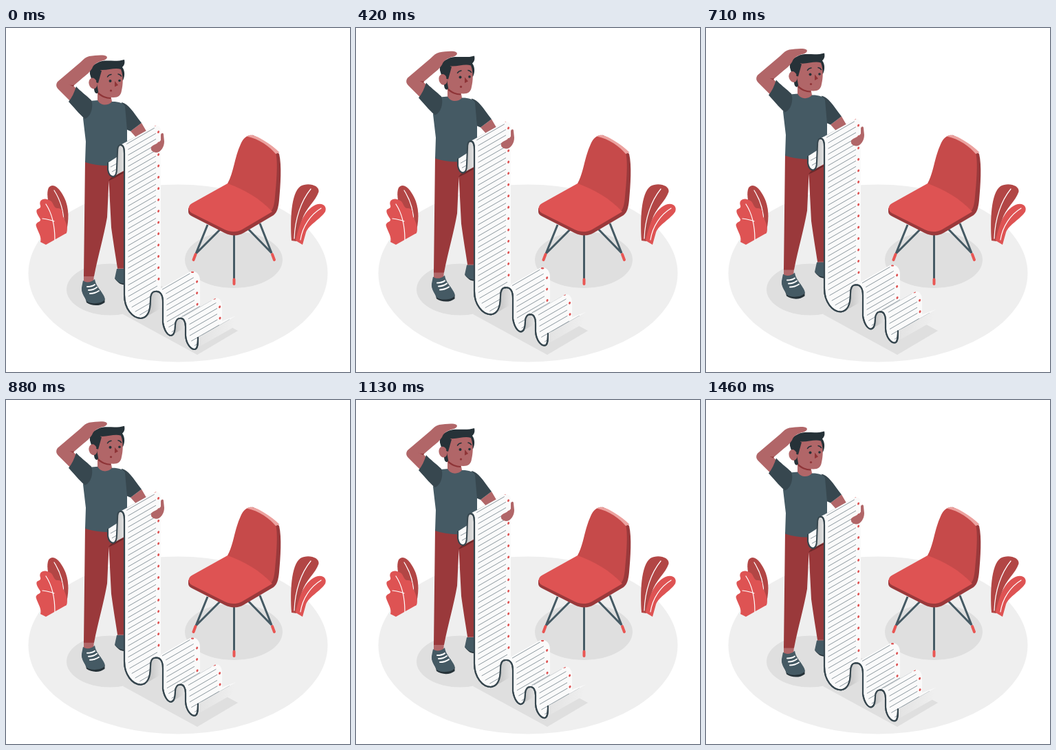
These frames come from a looping animation (500 by 500 pixels, 1.5 s). An HTML page:

```html
<!DOCTYPE html>
<html lang="en">
<head>
<meta charset="utf-8">
<title>Long list</title>
<style>
html, body { margin: 0; width: 100%; height: 100%; overflow: hidden; background: #fff; }
svg { display: block; width: 100%; height: 100%; }
.red { fill: #de5353; } .wine { fill: #9a393b; } .leaf { fill: #b24645; }
.skin { fill: #b16668; } .shirt { fill: #455a64; } .sleeve { fill: #37474f; }
.ink { fill: #263238; } .paper { fill: #fafafa; }
.vein, .lace { fill: none; stroke: #fff; stroke-width: 1.2; stroke-linecap: round; }
.lace { stroke-width: 2; }
.leg { fill: none; stroke: #455a64; stroke-width: 3; }
.tip { fill: none; stroke: #e95653; stroke-width: 4; stroke-linecap: round; }
.edge { fill: none; stroke: #37474f; stroke-width: 2.1; stroke-linecap: round; stroke-linejoin: round; }
.rule { stroke: #7f8d95; stroke-width: .9; }
</style>
</head>
<body>
<svg viewBox="0 0 500 500">
  <defs>
    <linearGradient id="fold"><stop offset="0" stop-color="#bdbdbd"/><stop offset="1" stop-color="#e6e6e6"/></linearGradient>
    <linearGradient id="back"><stop offset="0" stop-color="#e2e2e2"/><stop offset="1" stop-color="#efefef"/></linearGradient>
  </defs>

  <ellipse cx="250" cy="356.5" rx="217.5" ry="129" fill="#efefef"/>
  <g fill="#dfdfdf">
    <ellipse cx="151" cy="380" rx="63" ry="37.5"/>
    <ellipse cx="331" cy="337" rx="71" ry="41"/>
    <path d="M170 416L278 475L337 440L324 433L280 410L226 375Z"/>
  </g>

  <!-- plants -->
  <path class="leaf" d="M82 298C70 280 55 247 62 232C70 222 82 238 87 252C93 270 90 285 87 299Z"/>
  <path class="vein" d="M70 236C79 250 84 267 84 284"/>
  <path class="red" d="M58 315L50 311C53 304 44 292 43.500 286C45 281 51 282 50 278C46 272 43 267 45 264C48 262 51 262 50 258C47 250 55 246 62 250C70 252 68 261 74 262C80 262 83 264 82 272C86 280 91 290 88 298Z"/>
  <path class="vein" d="M58 256C66 268 71 284 71 308M53 277C60 278 65 279 70 281"/>
  <path class="leaf" d="M415 309C413 280 414 240 428 230C438 224 456 228 454.500 238C450 252 435 262 430 280C426 293 424 303 422 310Z"/>
  <path class="vein" d="M443 234C429 251 420 277 419 306"/>
  <path class="red" d="M421 309C425 290 432 265 450 257C461 253 467 260 464 267C458 277 440 286 436 297L431 315Z"/>
  <path class="vein" d="M458 262C443 271 431 288 428 308"/>

  <!-- chair -->
  <path class="leg" d="M293 286L276 328L311 293M369 284L386 327L350 290M331.500 298V366"/>
  <path class="tip" d="M275.500 329L272.500 337M387 329L390 337M331.500 365.500V372"/>
  <path class="wine" d="M265 262V267C265 270 267 272 271 274L318 298C326 302 337 303 345 298L389 272C394 268 396 261 397 250C399 228 401 200 397 183C390 176 370 160 358 155.500L330 230Z"/>
  <path d="M322 226C331 210 332 188 341 169C345 160 351 155 358 156C370 160 385 170 392 181C395 192 394 217 391 245C390 256 389 263 383 269L330 245Z" fill="#c64a4a"/>
  <path d="M350 157.500C356 153.500 364 157 374 163C384 169 392 175 397.500 181L392 183C384 173 368 161 350 157.500Z" fill="#eca29f"/>
  <path class="red" d="M322 226L270 255C264 259 264 265 270 269L318 293C326 297 336 297 343 293L387 267C368 247 347 235 322 226Z"/>

  <g id="float">
    <!-- trousers and shoes -->
    <path class="skin" d="M113 358H128L127 371H113ZM162 345H173V356H162Z"/>
    <path class="wine" d="M115 193L113 361H128C134 330 142 304 147 275L149.500 222L153 290C156 312 159 330 162 349H174V193Z"/>
    <path d="M149 222C155 213 164 211 172 209V210L158 218C154 220 151 221 149 222Z" fill="#6c2829"/>
    <path class="ink" d="M110 380C112 389 116 392 117 399C124 404 136 405 143.500 399V393ZM158 364C163 371 168 374 174 373V366Z"/>
    <path class="shirt" d="M112 367C116 371 124 370 129 365C130 373 135 378 139 384C142 389 144 391 143.500 395C138 401 124 402 117 397C115 391 109 386 110 377ZM161 350L158 364C163 370 168 372 174 371V350Z"/>
    <path class="lace" d="M118 376Q125 376 129 373M120 381Q127 381 132 377M122 386Q129 386 135 382"/>

    <!-- torso -->
    <path class="skin" d="M181 150L197 138L204 150L190 160Z"/>
    <path class="sleeve" d="M168 108C178 110 184 121 197 138L181 150L174 147Z"/>
    <path class="shirt" d="M122 106L134 105L155 107C164 107 171 109 173 114L176 148V194C160 202 136 202 115 195L116 165L112 131Z"/>
    <path class="skin" d="M133 88V105C138 114 149 113 154 107L152 96Z"/>
    <path d="M134 93C139 98 146 101 152 101V103C145 103 138 100 134 96Z" fill="#8e3437"/>

    <!-- head -->
    <path class="ink" d="M122 67C121 58 126 54 134 50C142 45 160 50 172 46C173 51 172 54 169 57C173 62 173 70 170 76L140 83L133 95C129 96 128 91 128 87Z"/>
    <path class="skin" d="M137 61C148 62 158 57 167 60C171 70 170 83 168 91C167 98 163 101 156 101C147 101 138 97 134 92L132 80Z"/>
    <ellipse class="skin" cx="126.500" cy="80.500" rx="6" ry="8" transform="rotate(-15 126.500 80.500)"/>
    <path class="ink" d="M136 61L139 62L134 80L131 79Z"/>
    <circle class="ink" cx="151.500" cy="77" r="2"/><circle class="ink" cx="165" cy="76.500" r="1.800"/>
    <path d="M147.500 71Q149 68 153 67.500M163 67Q166 67.500 167.500 70" fill="none" stroke="#263238" stroke-width="1.500" stroke-linecap="round"/>
    <path d="M158 77L163 83L158 85.500Z" fill="#8e3437"/>
    <circle cx="152.500" cy="91" r="1.600" fill="#8e3437"/>

    <!-- raised arm -->
    <path class="skin" d="M95 108L76 89C73 86 72 82 75 78L108 50C113 45 116 42 121 41C130 40 141 38 146 41C149 44 144 47 138 48C130 51 127 54 125 59C122 64 117 68 112 72L98 84L104 90Z"/>
    <path d="M89 81Q94 84 99 82.500L98 85Z" fill="#8e3437"/>
    <path class="sleeve" d="M102 85C107 91 117 98 124 105C127 112 125 128 115 132C111 130 101 118 91 107C96 101 99 94 102 85Z"/>

    <g id="paper"></g>
    <path class="skin" d="M211 173C214 169 222 168 225 163V155C226 152 229 152 229 155L230 165C230 173 225 181 218 181C212 180 210 177 211 173Z"/>
  </g>
</svg>
<script>
const NS = 'http://www.w3.org/2000/svg';
const paper = document.getElementById('paper');
const floating = document.getElementById('float');
const SLOPE = 0.577;
const RULE_GAP = 8.22;

function add(parent, tag, attrs) {
  const el = document.createElementNS(NS, tag);
  for (const key in attrs) el.setAttribute(key, attrs[key]);
  return parent.appendChild(el);
}

// Each face follows its near edge; "rest" closes the visible outline.
const faces = [
  { edge: 'M166.5 170C170 170 172 175 172 182V388C172 408 184 422 196 422C207 421 210 410 210 396C210 387 213 383 217 383',
    rest: 'L225 379V149C225 144 221 141 217 142Z', start: -4.3 },
  { edge: 'M217 383C225 382 228 389 228 398V428C230 440 235 447 240 447C245 446 246 440 246 432C246 426 249 422 253 422',
    rest: 'L282 406V367C282 358 276 352 268 354Z', start: 4.5 },
  { edge: 'M253 422C258 421 261 427 261 434V447C262 460 269 467 274 467C278 467 279 462 279 450',
    rest: 'L334 418.5L314 426V404C314 396 309 391 304 393Z', start: 0 }
];

function drawFace({ edge, rest, start }, i) {
  const clip = add(paper, 'clipPath', { id: 'face' + i });
  add(clip, 'path', { d: edge + rest });
  add(paper, 'path', { class: 'paper', d: edge + rest });
  const g = add(paper, 'g', { 'clip-path': `url(#face${i})` });
  const line = add(paper, 'path', { class: 'edge', d: edge });
  const length = line.getTotalLength();
  let top = true;
  for (let n = 0; start + n * RULE_GAP < length; n++) {
    const p = line.getPointAtLength(Math.max(0, start + n * RULE_GAP));
    const at = dx => [p.x + dx, p.y - dx * SLOPE];
    const [x1, y1] = at(5.5), [x2, y2] = at(46);
    add(g, 'line', { class: 'rule', x1, y1, x2, y2 });
    if (n % 2 === 0) {
      const [x, y] = at(49.6);
      add(g, 'ellipse', { class: 'red', rx: top ? 2.2 : 1.4, ry: top ? 1.3 : 2,
        transform: `translate(${x} ${y}) rotate(${top ? 0 : 25})` });
      top = false;
    }
  }
}

function drawPaper() {
  const loop = 'M148 196V206C149 212 152 216 156 216C160 215 161 210 161 204L162 180C162 173 164 170 166.5 170';
  add(paper, 'path', { class: 'paper', d: 'M148 196L162 187L161 204C161 210 160 215 156 216C152 216 149 212 148 206Z' });
  add(paper, 'path', { class: 'rule', d: 'M152 202L161 197M154 209L161 205' });
  add(paper, 'path', { fill: 'url(#fold)', d: 'M158 215C161 212 161 208 161 204L162 180C162 173 164 170 166.5 170C170 170 172 175 172 182V207Z' });
  add(paper, 'path', { fill: 'url(#back)', d: 'M276 466L329 436L332 420L279 450Z' });
  drawFace(faces[0], 0);
  add(paper, 'path', { fill: 'url(#fold)', d: 'M203 420C209 415 210 405 210 396C210 387 213 383 217 383C225 382 228 389 228 398V406Z' });
  drawFace(faces[1], 1);
  add(paper, 'path', { fill: 'url(#fold)', d: 'M242 446C246 443 246 437 246 432C246 426 249 422 253 422C258 421 261 427 261 434V435Z' });
  drawFace(faces[2], 2);
  add(paper, 'path', { class: 'edge', d: loop });
  faces.forEach(f => add(paper, 'path', { class: 'edge', d: f.edge }));
}

const LOOP = 1500, RISE = 10;

function render(ms) {
  const p = (ms % LOOP) / LOOP;
  const y = -RISE * (1 - Math.abs(1 - 2 * p));
  floating.setAttribute('transform', `translate(0 ${y.toFixed(3)})`);
}

drawPaper();
render(0);
const begin = performance.now();
(function tick() {
  render(performance.now() - begin);
  requestAnimationFrame(tick);
})();
</script>
</body>
</html>
```
